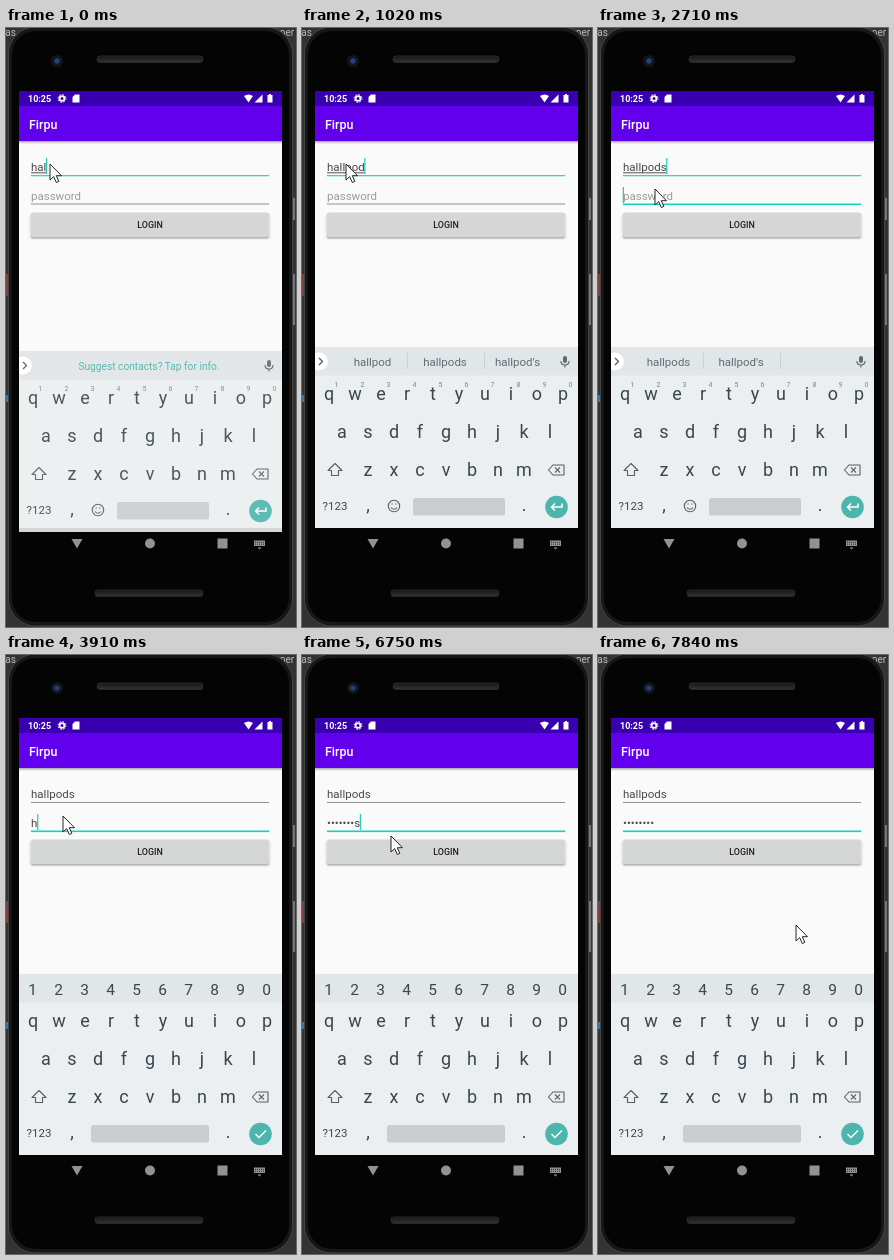
Animation of 290 by 599 pixels, one loop 7.99 s. Source, as an HTML page:

```html
<!DOCTYPE html>
<html lang="en">
<head>
<meta charset="utf-8">
<title>Login form</title>
<style>
  html, body { margin: 0; width: 100%; height: 100%; overflow: hidden; background: #2b2b2b; }
  svg { display: block; width: 290px; height: 599px; }
  text { font-family: Roboto, Arial, sans-serif; fill: #37474f; }
  .mid { text-anchor: middle; }
  .field { font-size: 11.5px; fill: #484848; }
  .key { font-size: 18px; }
  .digit { font-size: 15.5px; }
  .hint { font-size: 7px; fill: #78868d; }
  .word { font-size: 11.5px; fill: #5f6e76; }
  .line { fill: none; stroke: #546067; stroke-width: 1.1; stroke-linejoin: round; }
</style>
</head>
<body>
<svg viewBox="0 0 290 599">
  <defs>
    <clipPath id="screen"><path d="M13 63H276V505H13Z"/></clipPath>
    <linearGradient id="shade" x2="0" y2="1">
      <stop stop-color="#aaa"/><stop offset="1" stop-color="#fafafa"/>
    </linearGradient>
    <linearGradient id="slot" x2="0" y2="1">
      <stop stop-color="#161616"/><stop offset="1" stop-color="#343434"/>
    </linearGradient>
    <filter id="soft" x="-5%" y="-30%" width="110%" height="170%"><feGaussianBlur stdDeviation="1.3"/></filter>
  </defs>

  <!-- desktop slivers and phone body -->
  <path fill="#333" d="M0 0H290V599H0Z"/>
  <text x="-4" y="8" font-size="10" style="fill:#bbb">ras</text>
  <text x="274" y="8" font-size="10" style="fill:#bbb">ner</text>
  <path fill="#843f3f" d="M0 246h2v22h-2z"/>
  <path fill="#3478b4" d="M0 367h2v7h-2z"/>
  <path fill="#777" d="M285 170h4v22h-4zM285 246h4v51h-4z"/>
  <rect x="2.5" y="-1" width="284" height="599" rx="27" fill="#171717" stroke="#444"/>
  <rect x="6" y="3" width="277" height="591" rx="24" fill="#040404"/>
  <circle cx="51" cy="33" r="6" fill="#10151f"/>
  <circle cx="51" cy="33" r="2.8" fill="#24406e"/>
  <rect x="91" y="28" width="106" height="6.5" rx="3" fill="url(#slot)" stroke="#292929"/>
  <rect x="89" y="562" width="108" height="6.5" rx="3" fill="url(#slot)" stroke="#292929"/>

  <g clip-path="url(#screen)">
    <path fill="#fafafa" d="M13 63H276V500H13Z"/>
    <path fill="#3900b1" d="M13 63H276V79H13Z"/>
    <path fill="#6200ee" d="M13 78H276V113H13Z"/>
    <path fill="url(#shade)" d="M13 113H276V116H13Z"/>
    <text x="22" y="74" font-size="9" font-weight="700" style="fill:#fff">10:25</text>
    <circle cx="56" cy="70.5" r="2.4" fill="none" stroke="#fff" stroke-width="1.8"/>
    <circle cx="56" cy="70.5" r="3.9" fill="none" stroke="#fff" stroke-dasharray="1.6 1.46"/>
    <path fill="#fff" d="M69 66.5h4.5v8h-7v-5.500zM238 68q4.500-3 9 0l-4.500 6.500zM263 66h2v1h1.500v7.500h-5v-7.500h1.500z"/>
    <path fill="#fff" d="M256.500 66.500v8h-8z"/>
    <text x="23" y="101" font-size="12.5" font-weight="500" style="fill:#fff">Firpu</text>

    <!-- form -->
    <rect id="userLine" x="25" width="238"/>
    <rect id="passLine" x="25" width="238"/>
    <text id="user" class="field" x="25" y="143"></text>
    <rect id="under" x="25" y="144.300" height="1" fill="#555"/>
    <text id="pass" class="field" x="25" y="172"></text>
    <rect id="caret1" y="130" width="1.300" height="16" fill="#2bcdba"/>
    <rect id="caret2" y="159" width="1.300" height="16" fill="#2bcdba"/>
    <rect id="lift" x="24" y="186" width="240" height="25" rx="2" fill="#777" filter="url(#soft)"/>
    <rect x="25" y="185.500" width="238" height="25" rx="2" fill="#b9b9b9"/>
    <rect x="25" y="184.500" width="238" height="24.500" rx="2" fill="#d5d6d6"/>
    <rect id="ripple" x="25" y="184.500" height="24.500" rx="2" fill="#b7b8b8"/>
    <text class="mid" x="144" y="200.200" font-size="8.9" font-weight="500" style="fill:#222">LOGIN</text>

    <!-- keyboard -->
    <g id="board">
      <path fill="#eceff1" d="M13 319H276V500H13Z"/>
      <path fill="#e1e6e9" d="M13 319H276V347.500H13Z"/>
      <g id="keys"></g>
      <g id="strip">
        <circle cx="17" cy="333.500" r="9" fill="#fff"/>
        <path class="line" d="M17 330l3.500 3.500-3.500 3.500" style="stroke-width:1.400"/>
        <rect x="261" y="328" width="4" height="7" rx="2" fill="#5f6b72"/>
        <path class="line" d="M259 333q0 4 4 4t4-4M263 337v2.500"/>
        <g id="words"></g>
      </g>
      <g id="digits"></g>
      <path class="line" d="M33 435.500l7 7h-3.500v5h-7v-5h-3.500z"/>
      <path class="line" d="M251 437h11v10h-11l-4.500-5zM253 439.500l5 5m0-5l-5 5"/>
      <text class="mid" x="33" y="482" font-size="11.500">?123</text>
      <text class="mid key" x="66" y="483">,</text>
      <text class="mid key" x="222" y="483">.</text>
      <g id="smile">
        <circle class="line" cx="92" cy="478" r="5.700"/>
        <path class="line" d="M89 479.500q3 3.500 6 0M89.500 476h1.300M93.200 476h1.300"/>
      </g>
      <rect id="space" y="470" height="17.500" rx="2" fill="#c9cdd0"/>
      <circle cx="254.500" cy="479" r="11.300" fill="#4db6ac"/>
      <path id="enter" fill="none" stroke="#fff" stroke-width="1.500"/>
    </g>
  </g>

  <!-- navigation bar -->
  <g fill="#929292">
    <path d="M65.500 511h11l-5.500 9.500zM211.500 510.500h10v10h-10z"/>
    <circle cx="144" cy="515.500" r="5"/>
    <path d="M248 512.500h11v5.500h-11zM251.500 519.500h4l-2 2z"/>
    <path d="M249 514.300h9M249 516.200h9" stroke="#000" stroke-width=".7" stroke-dasharray="1 1"/>
  </g>

  <path id="mouse" d="M0 0V16L3.700 12.600L6.300 18.500L8.800 17.400L6.300 11.700H11.500Z" fill="#fff" stroke="#111" stroke-width=".9"/>
</svg>
<script>
const LOOP = 7990;
const NAME = "hallpods";
const $ = id => document.getElementById(id);
const set = (id, attrs) => { for (const k in attrs) $(id).setAttribute(k, attrs[k]); };
const show = (id, on) => set(id, { visibility: on ? "visible" : "hidden" });
const put = (id, html) => { if ($(id).seen !== html) $(id).innerHTML = $(id).seen = html; };
const label = (cls, x, y, s) => `<text class="mid ${cls}" x="${x}" y="${y}">${s}</text>`;
const row = (cls, s, x, y) => [...s].map((c, i) => label(cls, x + 26 * i, y, c)).join("");

put("keys", row("key", "qwertyuiop", 27, 372) + row("key", "asdfghjkl", 40, 410) + row("key", "zxcvbnm", 66, 447.5));
put("digits", row("digit", "1234567890", 26.5, 339.5));
const hints = row("hint", "1234567890", 34.5, 359);
const bars = '<path d="M105.500 325v16M182.500 325v16" stroke="#cbd1d4"/>';
const triple = list => bars + list.map((w, i) => label("word", 70.5 + 72.5 * i, 337.5, w)).join("");
const offer = '<text class="mid" x="143" y="341" font-size="10.2" dy="-3.5" style="fill:#45b5a5">Suggest contacts? Tap for info.</text>';
const stem = NAME.slice(0, -1);

// Each track lists [start time, value]
const at = (track, t) => track.filter(k => k[0] <= t).pop()[1];
const userCount = [[0, 3], [140, 4], [280, 5], [590, 6], [1020, 7], [1270, 8]];
const passCount = [[0, 0], [3910, 1], [4210, 2], [4490, 4], [4810, 5], [5080, 6], [5580, 7], [5700, 8]];
const words = [[0, offer], [140, triple([stem, NAME, stem + "'s"])], [1270, triple([NAME, stem + "'s"])], [2860, ""]];
const userCaret = [[0, 1], [1850, 0], [2280, 1], [2860, 0]];
const passCaret = [[0, 0], [2710, 1], [3480, 0], [3910, 1], [5820, 0], [6490, 1], [7690, 0]];
const press = [[0, 0], [7300, 1], [7540, 0.7], [7690, 0.3], [7840, 0]];
// Pointer moves: first step, last step, number of steps, destination
const moves = [[1850, 2420, 5, 57, 161], [6350, 6900, 5, 110, 195], [7420, 7840, 4, 198, 270]];

function pointer(t) {
  let x = 44, y = 136;
  for (const [a, b, n, tx, ty] of moves) {
    if (t < a) break;
    const p = Math.min(1, (1 + Math.floor((t - a) / (b - a) * (n - 1))) / n);
    x += (tx - x) * p;
    y += (ty - y) * p;
  }
  return `translate(${Math.round(x)} ${Math.round(y)})`;
}

function draw(t) {
  const numeric = t >= 3910, onPass = t >= 2710, leftUser = t >= 2860;

  put("user", NAME.slice(0, at(userCount, t)));
  const userWidth = $("user").getComputedTextLength();
  set("under", { width: userWidth });
  show("under", !leftUser);
  set("caret1", { x: 24.5 + userWidth });
  show("caret1", at(userCaret, t));
  set("userLine", leftUser ? { y: 147, height: 1, fill: "#8f8f8f" } : { y: 147, height: 1.3, fill: "#48cdb9" });

  const n = at(passCount, t);
  const last = t < 7420 ? NAME[n - 1] : "•";
  put("pass", n ? "•".repeat(n - 1) + last : "password");
  $("pass").style.fill = n ? "#484848" : "#9a9a9a";
  set("caret2", { x: 24.7 + (n ? $("pass").getComputedTextLength() : 0) });
  show("caret2", at(passCaret, t));
  set("passLine", onPass ? { y: 175.5, height: 1.6, fill: "#12d3bf" } : { y: 175.5, height: 1, fill: "#8f8f8f" });

  const p = at(press, t);
  set("ripple", { opacity: p, width: t < 7420 ? 215 : 238 });
  set("lift", { opacity: 0.25 + 0.55 * p });

  set("board", t < 140 ? { transform: "translate(0 4)", opacity: 0.9 } : { transform: "", opacity: 1 });
  put("words", at(words, t) + hints);
  show("strip", !numeric);
  show("smile", !numeric);
  show("digits", numeric);
  set("space", numeric ? { x: 85, width: 118 } : { x: 111, width: 92 });
  set("enter", { d: numeric ? "M249.500 479l3.500 3.500 7-7" : "M260 475.500v3.500h-10.500m3.500-3.500l-3.500 3.500 3.500 3.500" });

  set("mouse", { transform: pointer(t) });
}

function tick() {
  draw(performance.now() % LOOP);
  requestAnimationFrame(tick);
}
tick();
</script>
</body>
</html>
```
